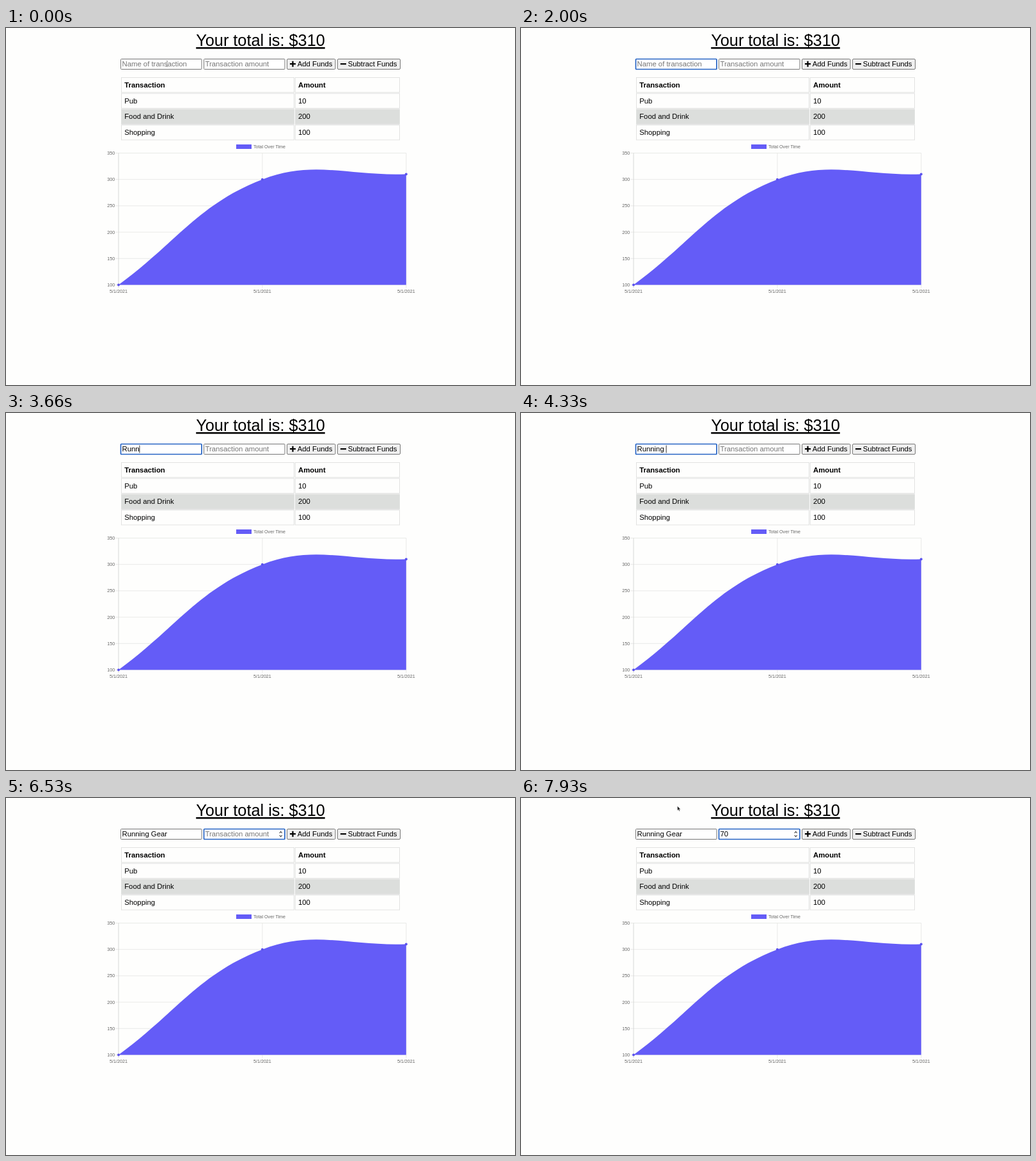
Recreate the animation shown at these times as an HTML page. Size 796 px wide and 558 px high, loop 8 s.

```html
<!DOCTYPE html>
<html lang="en">
<head>
<meta charset="utf-8">
<title>Transaction tracker</title>
<style>
  html, body { margin: 0; width: 100%; height: 100%; overflow: hidden; background: #fefefd; }
  svg { display: block; width: 796px; height: 558px; font: 11.33px "Liberation Sans", Arial, sans-serif; }
  text { white-space: pre; }
  .title { font-size: 25.3px; text-decoration: underline; text-decoration-skip-ink: none; }
  .head { font-weight: bold; }
  .small { font-size: 7.15px; fill: #666; }
  .end { text-anchor: end; }
  .middle { text-anchor: middle; }
  .field { fill: #fff; stroke: #767676; }
  .field.focus { stroke: #2563c4; stroke-width: 1.7; }
  .placeholder { fill: #757575; }
</style>
</head>
<body>
<svg id="stage" viewBox="0 0 796 558"></svg>
<script>
const stage = document.getElementById('stage');
const LOOP = 8000, PURPLE = '#645cf7';

function add(tag, attrs, content = '') {
  const node = document.createElementNS('http://www.w3.org/2000/svg', tag);
  for (const key in attrs) node.setAttribute(key, attrs[key]);
  node.textContent = content;
  return stage.appendChild(node);
}
const label = (x, y, content, cls = '') => add('text', { x, y, class: cls }, content);
const box = (x, y, width, height, attrs) => add('rect', { x, y, width, height, ...attrs });
const line = (d, stroke, width = 1) => add('path', { d, stroke, 'stroke-width': width, fill: 'none' });
const show = (node, on) => node.setAttribute('visibility', on ? 'visible' : 'hidden');

label(398, 28, 'Your total is: $310', 'title middle');

function makeField(x, placeholder) {
  const frame = box(x, 48.5, 126.5, 16, { class: 'field', rx: 1 });
  const text = label(x + 2, 60.3, '');
  const caret = line('M0 50.5V62.5', '#000', 0.8);
  return (value, focused, caretOn) => {
    frame.setAttribute('class', focused ? 'field focus' : 'field');
    text.setAttribute('class', value ? '' : 'placeholder');
    text.textContent = value || placeholder;
    const end = value ? text.getComputedTextLength() : 0;
    caret.setAttribute('transform', `translate(${x + 2.3 + end})`);
    show(caret, focused && caretOn);
  };
}
const drawName = makeField(179.5, 'Name of transaction');
const drawAmount = makeField(309.5, 'Transaction amount');

const spinner = line('M427.7 54.8l2-2.3 2 2.3M427.7 58.2l2 2.3 2-2.3', '#555', 1.2);

function button(x, width, icon, caption, textX) {
  box(x, 48.5, width, 16, { fill: '#efefef', stroke: '#767676', rx: 1.5 });
  line(icon, '#000', 2.2);
  label(textX, 60.3, caption);
}
button(439.5, 75.5, 'M444 56.2h9M448.5 51.7v9', 'Add Funds', 455.7);
button(518.5, 98, 'M523 56.2h9', 'Subtract Funds', 534.7);

[['Transaction', 'Amount'], ['Pub', '10'], ['Food and Drink', '200'], ['Shopping', '100']]
  .forEach((row, i) => {
    const y = 77.5 + i * 24.75;
    const paint = { fill: i === 2 ? '#dcdedc' : 'none', stroke: '#dedfde', 'stroke-width': 0.9 };
    box(180.5, y, 270, 23.2, paint);
    box(452.3, y, 163.2, 23.2, paint);
    row.forEach((cell, col) => label(col ? 457 : 185.2, y + 15.3, cell, i ? '' : 'head'));
  });

// Line chart with cubic smoothing between its points
const LEFT = 176, RIGHT = 625.8, TOP = 195.5, BOTTOM = 401.5;
const chartY = value => BOTTOM - (value - 100) / 250 * (BOTTOM - TOP);
const points = [100, 300, 310].map((v, i) => [LEFT + (RIGHT - LEFT) * i / 2, chartY(v)]);

function smoothPath(list, tension = 0.4) {
  const handles = list.map((p, i) => {
    const prev = list[i - 1] || p, next = list[i + 1] || p;
    const before = Math.hypot(p[0] - prev[0], p[1] - prev[1]);
    const after = Math.hypot(next[0] - p[0], next[1] - p[1]);
    const shift = amount => p.map((c, k) => c + tension * amount / (before + after) * (next[k] - prev[k]));
    return { back: shift(-before), ahead: shift(after) };
  });
  return list.map((p, i) => i ? `C${handles[i - 1].ahead} ${handles[i].back} ${p}` : `M${p}`).join('');
}

box(360, 182, 24, 7, { fill: PURPLE });
label(387, 188.1, 'Total Over Time', 'small');
for (let value = 100; value <= 350; value += 50) {
  line(`M171 ${chartY(value)}H${RIGHT}`, '#e4e5e3', 0.8);
  label(170.2, chartY(value) + 2.4, value, 'small end');
}
points.forEach(([x], i) => {
  line(`M${x} ${TOP}V406`, i ? '#e4e5e3' : '#cfd0ce', 0.8);
  label(x, 414, '5/1/2021', 'small middle');
});
add('path', { d: `${smoothPath(points)}V${BOTTOM}H${LEFT}Z`, fill: PURPLE });
points.forEach(([cx, cy]) => add('circle', { cx, cy, r: 2, fill: '#5a51ee' }));

const beam = line('M-1.5 -5L0 -4L1.5 -5M0 -4V4M-1.5 5L0 4L1.5 5', '#777', 0.7);
const arrow = add('path', {
  d: 'M0 0V7.2L1.7 5.7L2.9 8.2L4.1 7.6L3 5.2H5.2Z', fill: '#222', stroke: '#fff', 'stroke-width': 0.5
});

const FOCUS_NAME = 500, FOCUS_AMOUNT = 5900, MOUSE_MOVE = 7740;
const nameKeys = [...'Running Gear'].map((key, i) => ({ key, at: i < 8 ? 3150 + i * 135 : 4450 + (i - 8) * 190 }));
const amountKeys = [{ key: '7', at: 7080 }, { key: '0', at: 7320 }];

function typed(keys, start, t) {
  const done = keys.filter(k => k.at <= t);
  const last = done.length ? done[done.length - 1].at : start;
  return { value: done.map(k => k.key).join(''), caretOn: (t - last) % 1000 < 500 };
}

function render(t) {
  const inAmount = t >= FOCUS_AMOUNT;
  const name = typed(nameKeys, FOCUS_NAME, t), amount = typed(amountKeys, FOCUS_AMOUNT, t);
  drawName(name.value, t >= FOCUS_NAME && !inAmount, name.caretOn);
  drawAmount(amount.value, inAmount, amount.caretOn);
  show(spinner, inAmount);

  const progress = Math.min(1, Math.max(0, (t - MOUSE_MOVE) / 190));
  const eased = 1 - (1 - progress) ** 2;
  const y = 56 - 43.5 * eased;
  const place = `translate(${252 - 7.5 * eased} ${y})`;
  const moving = t >= MOUSE_MOVE;
  beam.setAttribute('transform', place);
  arrow.setAttribute('transform', place);
  show(beam, t < FOCUS_NAME || (moving && y > 48));
  show(arrow, moving && y <= 48);
}

const begin = performance.now();
function tick() {
  render((performance.now() - begin) % LOOP);
  requestAnimationFrame(tick);
}
tick();
</script>
</body>
</html>
```
